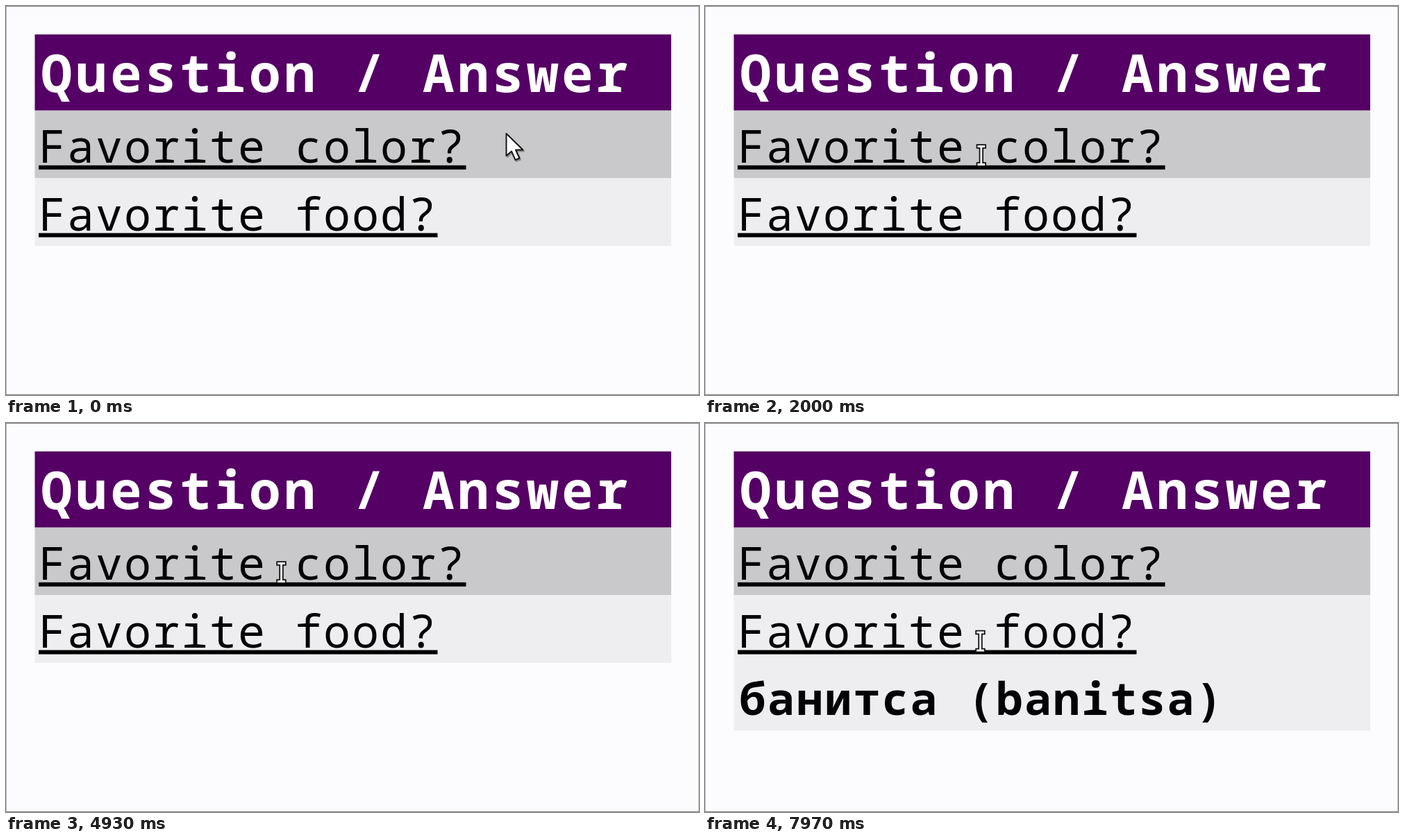
These frames come from a looping animation (998 by 561 pixels, 8 s). An HTML page:

```html
<!DOCTYPE html>
<html lang="en">
<head>
<meta charset="utf-8">
<style>
  html, body { margin: 0; width: 100%; height: 100%; overflow: hidden; background: #fcfcfe; }
  svg { display: block; width: 100%; height: 100%; }
  text { font: 400 65px "Noto Sans Mono", monospace; letter-spacing: 2px; fill: #030305; }
  .header { font-size: 76px; font-weight: 700; letter-spacing: 4.4px; fill: #fff; }
  .answer { font-weight: 700; letter-spacing: 2.1px; }
</style>
</head>
<body>
<svg viewBox="0 0 998 561">
  <path d="M0 .5H998M0 560.5H998" stroke="#857d80"/>
  <path d="M.5 1V560M997.5 1V560" stroke="#c0b8ba"/>

  <rect x="41.5" y="41" width="916.5" height="110" fill="#550065"/>
  <text class="header" x="50" y="124">Question / Answer</text>

  <rect id="colorRow" x="41.5" y="150.5" width="916.5" fill="#c9c8cb"/>
  <text x="47" y="226">Favorite color?</text>
  <rect x="47" y="229.8" width="615.5" height="6"/>
  <text id="colorAnswer" class="answer" x="49" y="322.7">purple</text>

  <g id="food">
    <rect id="foodRow" x="41.5" y="248.2" width="916.5" fill="#eeedf0"/>
    <text x="47" y="323.5">Favorite food?</text>
    <rect x="47" y="327.5" width="574.5" height="6"/>
    <text id="foodAnswer" class="answer" x="49" y="420.5">банитса (banitsa)</text>
  </g>

  <g id="arrow" stroke-linejoin="round">
    <path d="M0 0V32L7.5 25.5L13 38L19 35.5L13.5 23.5H24Z" transform="translate(1.5 2)" fill="#000" opacity=".3" stroke="#000" stroke-width="2"/>
    <path d="M0 0V32L7.5 25.5L13 38L19 35.5L13.5 23.5H24Z" fill="#fff" stroke="#151515" stroke-width="2"/>
  </g>
  <g id="beam" fill="none" stroke-linecap="square">
    <path d="M-4 -13H4M0 -13V13M-4 13H4" stroke="#111" stroke-width="6.4"/>
    <path d="M-4 -13H4M0 -13V13M-4 13H4" stroke="#fff" stroke-width="2.8"/>
  </g>
</svg>
<script>
const LOOP = 8000, ROW = 97.7;
const el = id => document.getElementById(id);
const progress = (t, start, end) => Math.min(1, Math.max(0, (t - start) / (end - start)));
const ease = u => (1 - Math.cos(Math.PI * u)) / 2;
const show = (node, on) => node.setAttribute("visibility", on ? "visible" : "hidden");

function pointer(t) {
  const across = ease(progress(t, 670, 2070) ** 0.826);
  const down = ease(progress(t, 6530, 7070));
  return {
    x: 720.5 - 324 * across,
    y: 184 + 31.5 * Math.sin(across * Math.PI / 2) + 99.5 * down
  };
}

function draw(now) {
  const t = now % LOOP;
  const colorOpen = t >= 2430 && t < 4930;
  const foodOpen = t >= 7600;

  el("colorRow").setAttribute("height", ROW * (colorOpen ? 2 : 1));
  el("foodRow").setAttribute("height", ROW * (foodOpen ? 2 : 1));
  el("food").setAttribute("transform", `translate(0 ${colorOpen ? ROW : 0})`);
  show(el("colorAnswer"), colorOpen);
  show(el("foodAnswer"), foodOpen);

  const { x, y } = pointer(t);
  const overText = x < 662;
  for (const id of ["arrow", "beam"]) el(id).setAttribute("transform", `translate(${x} ${y})`);
  show(el("arrow"), !overText);
  show(el("beam"), overText);
}

const start = performance.now();
function tick() {
  draw(performance.now() - start);
  requestAnimationFrame(tick);
}
tick();
</script>
</body>
</html>
```
